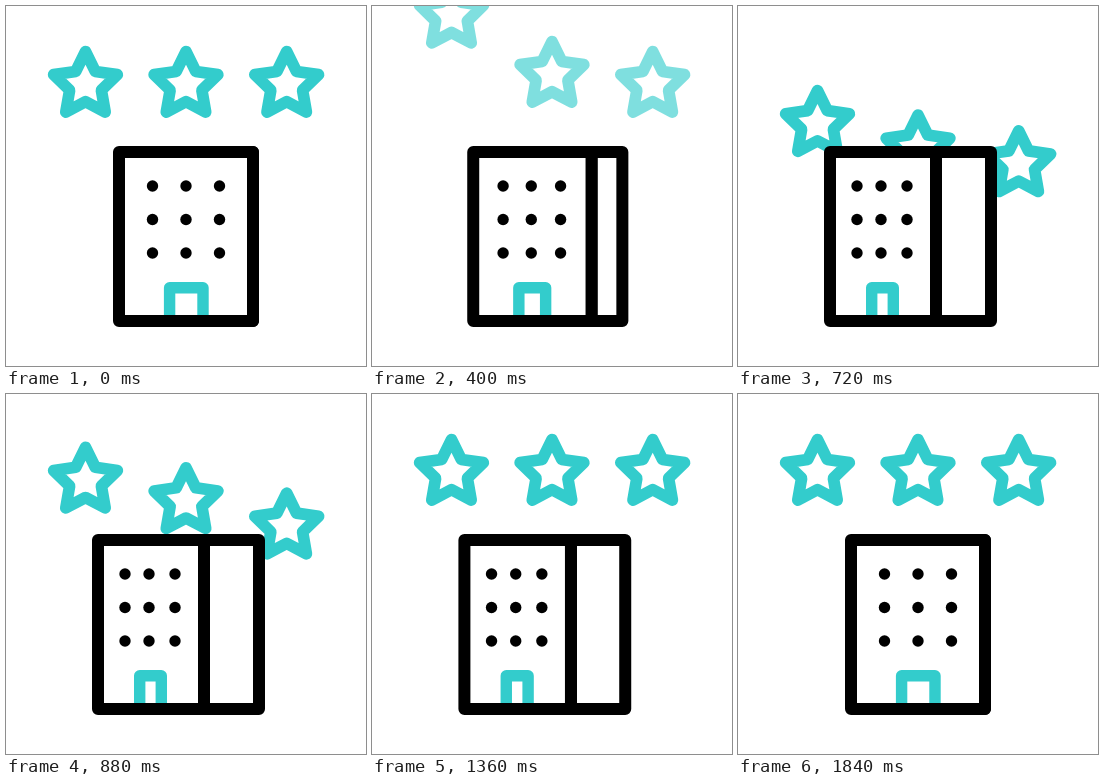
These frames come from a looping animation (360 px wide and 360 px high, 2000 ms). An HTML page with a canvas:

```html
<!DOCTYPE html>
<html lang="en">
<head>
<meta charset="utf-8">
<title>Hotel</title>
<style>
  html, body { margin: 0; width: 100%; height: 100%; overflow: hidden; background: #fff; }
  canvas { display: block; width: 360px; height: 360px; }
</style>
</head>
<body>
<canvas id="stage" width="360" height="360"></canvas>
<script>
const ctx = document.getElementById('stage').getContext('2d');
const LOOP = 2000, STEP = 40, CUT = 720;
const TEAL = '#33cccc';

const clamp = v => Math.min(1, Math.max(0, v));
const lerp = (a, b, p) => a + (b - a) * p;
const ease = (t, start, duration) =>
  (1 - Math.cos(Math.PI * clamp((t - start) / duration))) / 2;

const stars = [
  { x: 79.5, leave: 142, enter: 432 },
  { x: 180, leave: 302, enter: 544 },
  { x: 280.7, leave: 414, enter: 656 }
];

// Stars accelerate off the top, then rise from behind the building.
function starOffset(star, t) {
  if (t < CUT) return -0.00104 * Math.max(0, t - star.leave) ** 2;
  return 82 * (1 - ease(t, star.enter, 560));
}

function drawStar(cx, cy) {
  ctx.beginPath();
  for (let i = 0; i < 10; i++) {
    const r = i % 2 ? 16.7 : 33.5;
    const a = (i / 5 - 0.5) * Math.PI;
    ctx.lineTo(cx + r * Math.cos(a), cy + r * Math.sin(a));
  }
  ctx.closePath();
  ctx.stroke();
}

function drawWall(left, right) {
  ctx.fillStyle = '#fff';
  ctx.strokeStyle = '#000';
  ctx.lineWidth = 12;
  ctx.beginPath();
  ctx.rect(left, 146, right - left, 169);
  ctx.fill();
  ctx.stroke();
}

function drawBuilding(t) {
  const closing = ease(t, 1320, 450);
  const open = ease(t, 120, 520) - closing;
  const at = (shut, turned) => lerp(shut, turned, open);

  const left = at(113, 92), edge = at(247, 198);
  const back = at(247, 253) + 5.7 * Math.sin(Math.PI * closing);
  drawWall(edge, back);
  drawWall(left, edge);

  ctx.fillStyle = '#000';
  for (const x of [at(146.5, 119), at(180, 143), at(213.5, 169)]) {
    for (const y of [180, 213.5, 247]) {
      ctx.beginPath();
      ctx.arc(x, y, 5.7, 0, 2 * Math.PI);
      ctx.fill();
    }
  }

  const doorLeft = at(163.6, 133.7), doorRight = at(197, 155.3);
  ctx.strokeStyle = TEAL;
  ctx.lineWidth = 11.4;
  ctx.beginPath();
  ctx.moveTo(doorLeft, 309);
  ctx.lineTo(doorLeft, 281.7);
  ctx.lineTo(doorRight, 281.7);
  ctx.lineTo(doorRight, 309);
  ctx.stroke();
}

function draw(t) {
  ctx.fillStyle = '#fff';
  ctx.fillRect(0, 0, 360, 360);
  ctx.lineJoin = 'round';

  ctx.globalAlpha = t < CUT ? 1 - clamp((t - 160) / 640) : 1;
  ctx.strokeStyle = TEAL;
  ctx.lineWidth = 11.7;
  for (const star of stars) drawStar(star.x, 79 + starOffset(star, t));
  ctx.globalAlpha = 1;

  drawBuilding(t);
}

const begin = performance.now();
function tick() {
  const t = (performance.now() - begin) % LOOP;
  draw(Math.floor(t / STEP) * STEP);
  requestAnimationFrame(tick);
}
tick();
</script>
</body>
</html>
```
